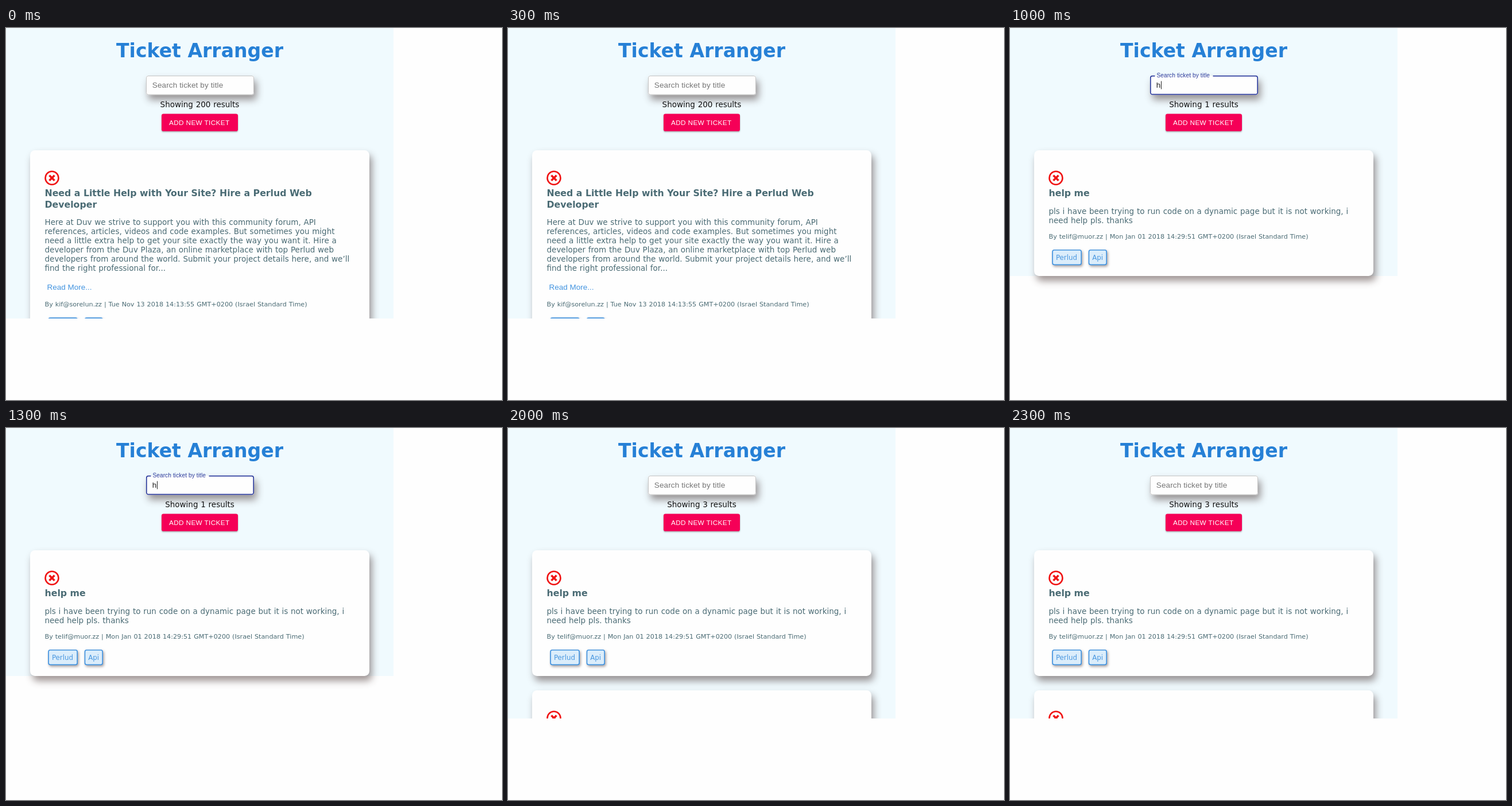
Recreate the animation shown at these times as an HTML page. Size 864 by 648 pixels, loop 2500 ms.

```html
<!DOCTYPE html>
<html lang="en">
<head>
<meta charset="utf-8">
<title>Ticket list</title>
<style>
  html, body { margin: 0; width: 100%; height: 100%; overflow: hidden; background: #fefefe; }
  svg { display: block; }
  text { font: 13.5px "DejaVu Sans", Verdana, sans-serif; word-spacing: .034em; fill: #4a6b74; }
  .heading, .title { font-weight: bold; word-spacing: 0; }
  .heading { font-size: 33.1px; fill: #2680d6; text-anchor: middle; }
  .title { font-size: 15.75px; }
  .count { fill: #111; }
  .mid { text-anchor: middle; }
  .by { font-size: 11.2px; }
  .tag { font-size: 11.8px; fill: #4a98e0; }
  .field, .label, .button, .link { font-family: "Liberation Sans", Arial, sans-serif; word-spacing: 0; }
  .field, .label { letter-spacing: .00938em; fill: #757575; }
  .typed { fill: #222; }
  .label { font-size: 10.125px; fill: #303f9f; }
  .button { font-size: 11.81px; letter-spacing: .02857em; fill: #fff; }
  .link { fill: #4394e0; }
</style>
</head>
<body>
<svg width="864" height="648" viewBox="0 0 864 648">
  <defs>
    <clipPath id="page"><rect width="675" height="506"/></clipPath>
    <filter id="deep" filterUnits="userSpaceOnUse" x="0" y="0" width="864" height="760" color-interpolation-filters="sRGB">
      <feDropShadow dx="4.2" dy="8.4" stdDeviation="6.3" flood-color="#2a1412" flood-opacity=".45"/>
    </filter>
    <filter id="soft" filterUnits="userSpaceOnUse" x="0" y="0" width="864" height="760" color-interpolation-filters="sRGB">
      <feDropShadow dx="1.7" dy="2.5" stdDeviation="2.1" flood-color="#2a1412" flood-opacity=".4"/>
    </filter>
    <filter id="raised" filterUnits="userSpaceOnUse" x="0" y="0" width="864" height="760" color-interpolation-filters="sRGB">
      <feDropShadow dx="0" dy="1.3" stdDeviation="1.2" flood-color="#000" flood-opacity=".35"/>
    </filter>
  </defs>
  <g id="view" clip-path="url(#page)"></g>
</svg>
<script>
const view = document.getElementById('view');

const text = (x, y, cls, str) => `<text x="${x}" y="${y}" class="${cls}">${str}</text>`;
const box = (x, y, w, h, r, fill, extra = '') =>
  `<rect x="${x}" y="${y}" width="${w}" height="${h}" rx="${r}" fill="${fill}" ${extra}/>`;

const helpMe = {
  title: ['help me'],
  body: ['pls i have been trying to run code on a dynamic page but it is not working, i',
         'need help pls. thanks'],
  by: 'telif@muor.zz | Mon Jan 01 2018 14:29:51 GMT+0200 (Israel Standard Time)',
  tags: true
};
const hire = {
  title: ['Need a Little Help with Your Site? Hire a Perlud Web', 'Developer'],
  body: ['Here at Duv we strive to support you with this community forum, API',
         'references, articles, videos and code examples. But sometimes you might',
         'need a little extra help to get your site exactly the way you want it. Hire a',
         'developer from the Duv Plaza, an online marketplace with top Perlud web',
         'developers from around the world. Submit your project details here, and we’ll',
         'find the right professional for...'],
  more: true,
  by: 'kif@sorelun.zz | Tue Nov 13 2018 14:13:55 GMT+0200 (Israel Standard Time)',
  tags: true
};
const notify = {
  title: ['Notifications not working'],
  body: ['Hi I was working with duv crm backend notificatication and just stoped',
         "working. See the code bellow CRM Backend code import duvCrm from 'duv-",
         "crm-backend'; export function notifySiteContributors(body, titulo, acao, url) {",
         'duvCrm.notifications.notify( body, ["Mobile", "Browser", "Dashboard"], {',
         '"title": titulo, "actionTitle": acao, "actionTarget": { "url": url }, "recipients": {',
         '"r...'],
  more: true,
  by: 'gondamur@dombun.zz | Thu Jul 12 2018 22:34:00 GMT+0300 (Israel Daylight Time)',
  hide: true
};

const tag = (x, y, w, name) =>
  box(x + .85, y + .85, w - 1.7, 25.6, 3, '#dbedfb', 'stroke="#4394e0" stroke-width="1.7" filter="url(#soft)"') +
  text(x + 6.7, y + 18.3, 'tag', name);

function card(top, ticket, height = 400) {
  let out = box(42, top, 591, height, 8.4, '#fefefe', 'filter="url(#deep)"') +
    `<g transform="translate(80 ${top + 48.2})" fill="none" stroke="#f01212">
      <circle r="11.5" stroke-width="2.6"/>
      <path d="M-4.5-4.5 4.5 4.5M4.5-4.5-4.5 4.5" stroke-width="3.5"/></g>`;
  if (!ticket) return out;

  let y = top + 80.4;
  ticket.title.forEach((line, i) => out += text(67.5, y + i * 19.5, 'title', line));
  y += (ticket.title.length - 1) * 19.5 + 30.5;
  ticket.body.forEach((line, i) => out += text(67.5, y + i * 16, '', line));
  y += (ticket.body.length - 1) * 16;
  if (ticket.more) out += text(71.4, y += 32.3, 'link', 'Read More...');
  y += ticket.more ? 29.7 : 27.2;
  out += text(67.5, y, 'by', 'By ' + ticket.by);
  if (ticket.tags) out += tag(73.2, y + 18.8, 51.8, 'Perlud') + tag(136.6, y + 18.8, 32.4, 'Api');
  if (ticket.hide) out += box(580.5, top + 12, 33.8, 23.4, 3.4, '#eaf4fc') + text(584.4, top + 27.8, 'link', 'hide');
  return out;
}

function searchField(typed) {
  const base = box(244, 83, 188, 33.5, 3.4, '#fefefe', 'filter="url(#deep)"');
  if (!typed)
    return base + box(244.5, 83.5, 187, 32.5, 3.4, 'none', 'stroke="#c4c4c4"') +
      text(254.8, 104, 'field', 'Search ticket by title');
  return base +
    '<path d="M252.5 83.7H248a3.2 3.2 0 0 0-3.2 3.2V112.5a3.2 3.2 0 0 0 3.2 3.2H428a3.2 3.2 0 0 0 3.2-3.2V86.9a3.2 3.2 0 0 0-3.2-3.2H353.5" fill="none" stroke="#303f9f" stroke-width="1.7"/>' +
    text(255.4, 86.2, 'label', 'Search ticket by title') +
    text(254.8, 104, 'field typed', typed) + box(263, 92.5, 1, 14, 0, '#222');
}

function scene({ count, cards, typed, hidden, bg = '#f0fafe', bottom = 506 }) {
  const shift = hidden ? 8 : 0;
  const status = hidden
    ? text(181, 141, 'count', `Showing ${count} results (${hidden} hidden tickets -`) +
      text(441, 141, 'link', 'restore') + text(487.5, 141, 'count', ')')
    : text(337.5, 138.3, 'count mid', `Showing ${count} results`);
  return box(0, 0, 675, bottom, 0, bg) +
    text(337.5, 50.8, 'heading', 'Ticket Arranger') +
    searchField(typed) + status +
    box(271, 149.4 + shift, 133, 30.4, 3.4, '#f50057', 'filter="url(#raised)"') +
    text(284, 168.8 + shift, 'button', 'ADD NEW TICKET') +
    cards(213 + shift);
}

const helpCard = top => card(top, helpMe, 219);
const threeResults = scene({ count: 3, cards: top => helpCard(top) + card(top + 244) });
const scenes = [
  scene({ count: 200, cards: top => card(top, hire) }),
  threeResults,
  scene({ count: 1, cards: helpCard, typed: 'h', bottom: 432 }),
  scene({ count: 3, cards: top => card(top, notify), hidden: 2, bg: '#f0fdff' }),
  threeResults
];

let shown = -1;
function draw() {
  const now = Math.floor(performance.now() % 2500 / 500);
  if (now !== shown) view.innerHTML = scenes[shown = now];
  requestAnimationFrame(draw);
}
draw();
</script>
</body>
</html>
```
